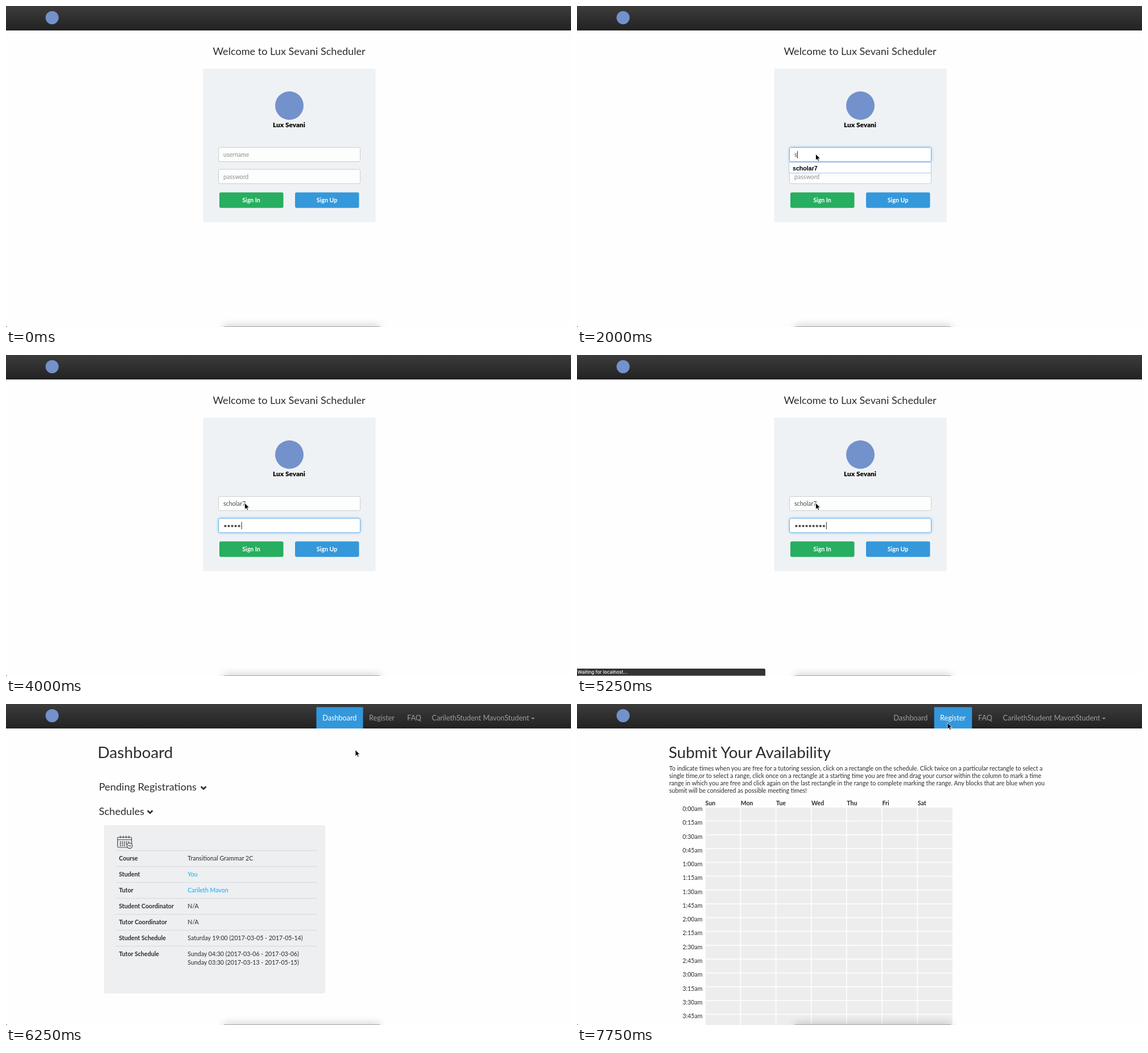
Recreate the animation shown at these times as an HTML page. Size 993x564 px, loop 8000 ms.

```html
<!DOCTYPE html>
<html lang="en">
<head>
<meta charset="utf-8">
<title>Scheduler sign-in</title>
<style>
  html, body { margin: 0; width: 100%; height: 100%; overflow: hidden; background: #fefefe; }
  svg { display: block; width: 993px; height: 564px; font: 10.6px Lato, sans-serif; fill: #2c2c2c; }
  text { white-space: pre; }
  .h1 { font-size: 27.8px; }
  .h3 { font-size: 18.1px; }
  .bold { font-weight: 700; }
  .mid { text-anchor: middle; }
  .end { text-anchor: end; }
  .link { fill: #0aaefb; }
  .button { fill: #fff; font-weight: 700; text-anchor: middle; }
  .mark { fill: #7391cb; }
  .wordmark { font-size: 11.8px; font-weight: 900; fill: #000; text-anchor: middle; }
  .nav text { font-size: 12.6px; fill: #9d9d9d; }
  .nav .on { fill: #fff; }
  .field { fill: #fcfdfd; stroke: #ccc; }
  .field.focus { fill: #fff; stroke: #66afe9; filter: drop-shadow(0 0 2.5px rgba(102,175,233,.6)); }
  .value { fill: #4a4a4a; }
  .hint { fill: #8f8f8f; }
  .option { font: 700 10.64px "Liberation Sans", Arial, sans-serif; fill: #000; }
  .status text { font: 500 8.2px Inter, sans-serif; fill: #fff; }
  .rule { stroke: #d6d9db; }
  .cell { fill: #ededed; }
  .chevron { fill: none; stroke: #2c2c2c; stroke-width: 2.7; }
  .icon { fill: none; stroke: #444; stroke-width: 1.2; }
</style>
</head>
<body>
<svg viewBox="0 0 993 564">
  <defs>
    <linearGradient id="bar" x2="0" y2="1">
      <stop stop-color="#3c3c3c"/><stop offset="1" stop-color="#222"/>
    </linearGradient>
    <filter id="soft" x="-20%" y="-200%" width="140%" height="500%"><feGaussianBlur stdDeviation="8"/></filter>
  </defs>
  <rect width="993" height="564" fill="#fefefe"/>

  <g id="login">
    <text class="h3 mid" x="497.5" y="86">Welcome to Lux Sevani Scheduler</text>
    <rect x="346.5" y="110" width="303" height="269.7" fill="#eff2f4"/>
    <circle class="mark" cx="498" cy="175" r="25"/>
    <text class="wordmark" x="497.5" y="213">Lux Sevani</text>
    <rect id="userBox" class="field" x="373.5" y="248.5" width="249" height="25" rx="2.8"/>
    <rect id="passBox" class="field" x="373.5" y="287" width="249" height="25" rx="2.8"/>
    <text id="user" x="382" y="265"></text>
    <text id="passHint" class="hint" x="382" y="303.7">password</text>
    <g id="dots" class="value"></g>
    <rect id="caret" width="1" height="12.5" fill="#222"/>
    <g id="list">
      <rect id="listBox" x="372.5" y="274.5" width="250" height="19" stroke="#a5c7ec"/>
      <text class="option" x="379" y="288.5">scholar7</text>
    </g>
    <rect x="375" y="327.5" width="112.5" height="27.3" rx="2.8" fill="#27ae60"/>
    <rect x="508" y="327.5" width="112.5" height="27.3" rx="2.8" fill="#3498db"/>
    <text class="button" x="431" y="345">Sign In</text>
    <text class="button" x="564" y="345">Sign Up</text>
  </g>

  <g id="dashboard">
    <text class="h1" x="161" y="94.5">Dashboard</text>
    <text class="h3" x="163.2" y="152">Pending Registrations</text>
    <text class="h3" x="163.2" y="194.5">Schedules</text>
    <path class="chevron" d="M342.8 145l4.4 4.4 4.4-4.4M248.8 187.3l4.4 4.4 4.4-4.4"/>
    <rect x="172" y="213" width="389" height="295.5" rx="3.5" fill="#edeff1"/>
    <g class="icon">
      <rect x="196.2" y="234" width="24.5" height="18" rx="1.5"/>
      <path d="M196 238.5h25M201 231.5v4.5M206 231.5v4.5M211 231.5v4.5M216 231.5v4.5"/>
      <path d="M200 242.5h18M200 245.7h14M200 248.9h11" stroke-width="1.9" stroke-dasharray="2 1.6"/>
      <circle cx="217.3" cy="249" r="4.7" fill="#edeff1"/>
      <path d="M214.8 248.6l2.5.7h2.6"/>
    </g>
    <g id="table"></g>
  </g>

  <g id="availability">
    <text class="h1" x="161" y="94.5">Submit Your Availability</text>
    <g id="intro"></g>
    <g id="grid"></g>
  </g>

  <rect width="993" height="43" fill="url(#bar)"/>
  <circle class="mark" cx="81" cy="20.5" r="11.5"/>
  <g id="nav" class="nav">
    <rect id="tab" y="5.5" height="37.5" fill="#3397dc"/>
    <text id="navDashboard" x="556.3" y="28.7">Dashboard</text>
    <text id="navRegister" x="638" y="28.7">Register</text>
    <text x="705" y="28.7">FAQ</text>
    <text class="end" x="919.5" y="28.7">CarilethStudent MavonStudent</text>
    <path d="M923 24h6l-3 3z" fill="#9d9d9d"/>
  </g>

  <rect x="383" y="563" width="274" height="14" filter="url(#soft)" opacity=".24" fill="#000"/>
  <rect x="383" y="563" width="274" height="1" fill="#aaa"/>
  <rect y="563" width="1.5" height="1" fill="#333"/>
  <g id="statusBar" class="status">
    <path d="M0 551h328.500q2.500 0 2.500 2.500V563.500H0z" fill="#333"/>
    <text id="status" x="1" y="560"></text>
  </g>
  <path id="pointer" d="M0 0V11.200L2.600 8.800 4.300 12.600 6.200 11.800 4.500 8.100H8z" fill="#000" stroke="#fff" stroke-width=".8"/>
</svg>
<script>
const $ = id => document.getElementById(id);
const show = (id, on) => $(id).style.display = on ? "" : "none";
const label = (x, y, words, kind = "") => `<text class="${kind}" x="${x}" y="${y}">${words}</text>`;

const rows = [
  ["Course", "Transitional Grammar 2C"],
  ["Student", "You", "link"],
  ["Tutor", "Carileth Mavon", "link"],
  ["Student Coordinator", "N/A"],
  ["Tutor Coordinator", "N/A"],
  ["Student Schedule", "Saturday 19:00 (2017-03-05 - 2017-05-14)"],
  ["Tutor Schedule", "Sunday 04:30 (2017-03-06 - 2017-03-06)"]
];
$("table").innerHTML = rows.map(([name, value, kind], i) => {
  const y = 257.5 + 28 * i;
  return `<path class="rule" d="M193 ${y}H547.500"/>` +
    label(198.5, y + 17.6, name, "bold") + label(319.3, y + 17.6, value, kind);
}).join("") + label(319.3, 458.3, "Sunday 03:30 (2017-03-13 - 2017-05-15)");

$("intro").innerHTML = [
  "To indicate times when you are free for a tutoring session, click on a rectangle on the schedule. Click twice on a particular rectangle to select a",
  "single time,or to select a range, click once on a rectangle at a starting time you are free and drag your cursor within the column to mark a time",
  "range in which you are free and click again on the last rectangle in the range to complete marking the range. Any blocks that are blue when you",
  "submit will be considered as possible meeting times!"
].map((line, i) => label(162, 117.3 + 13 * i, line)).join("");

const days = ["Sun", "Mon", "Tue", "Wed", "Thu", "Fri", "Sat"];
let grid = days.map((day, i) => label(225.5 + 62.2 * i, 178, day, "bold")).join("");
for (let r = 0; r < 16; r++) {
  const y = 182 + 24.27 * r;
  const minutes = String(r % 4 * 15).padStart(2, "0");
  grid += label(220.5, y + 6, `${r >> 2}:${minutes}am`, "end");
  days.forEach((_, c) => {
    grid += `<rect class="cell" x="${226 + 62.2 * c}" y="${y}" width="60.6" height="22.7"/>`;
  });
}
$("grid").innerHTML = grid;

// Each step changes only the named parts of the state.
const steps = [
  [0, { view: "login", at: null, focus: "", user: "", dots: 0, caret: false, list: 0, status: "", hover: false }],
  [250, { at: [560, 545] }],
  [500, { at: [480, 330] }],
  [750, { at: [380, 135] }],
  [1000, { at: [348, 215] }],
  [1250, { at: [419.5, 260], focus: "user" }],
  [1500, { caret: true }],
  [1750, { caret: false }],
  [2000, { user: "s", caret: true, list: 1 }],
  [2250, { user: "scholar7", list: 2 }],
  [2500, { list: 0 }],
  [2750, { focus: "pass" }],
  [3000, { caret: false }],
  [3250, { caret: true }],
  [3500, { dots: 1 }],
  [3750, { dots: 2 }],
  [4000, { dots: 5 }],
  [4250, { dots: 6 }],
  [4500, { dots: 8 }],
  [4750, { dots: 9 }],
  [5250, { status: "Waiting for localhost..." }],
  [5500, { view: "dashboard", caret: false, status: "" }],
  [5750, { at: [475, 212] }],
  [6000, { at: [566, 132] }],
  [6250, { at: [614, 80.5] }],
  [6500, { at: [639, 51] }],
  [6750, { at: [651, 33], hover: true, status: "localhost:3000/registrations" }],
  [7750, { view: "availability", status: "" }]
];
const states = [];
steps.forEach(([, change], i) => states.push({ ...states[i - 1], ...change }));

function draw(s) {
  ["login", "dashboard", "availability"].forEach(v => show(v, v === s.view));
  const home = s.view === "dashboard";
  show("nav", s.view !== "login");
  $("tab").setAttribute("x", home ? 545.5 : 627.7);
  $("tab").setAttribute("width", home ? 82 : 66.5);
  $("navDashboard").classList.toggle("on", home);
  $("navRegister").classList.toggle("on", s.hover);

  ["user", "pass"].forEach(f => $(f + "Box").classList.toggle("focus", s.focus === f));
  $("user").textContent = s.user || "username";
  $("user").setAttribute("class", s.user ? "value" : "hint");
  show("passHint", !s.dots);
  $("dots").innerHTML = Array.from({ length: s.dots }, (_, i) =>
    `<circle cx="${385.4 + 6.06 * i}" cy="300.5" r="2.1"/>`).join("");
  show("list", s.list);
  $("listBox").setAttribute("fill", s.list === 2 ? "#c5defb" : "#fff");

  const inPass = s.focus === "pass";
  const typed = s.user && s.view === "login" ? $("user").getComputedTextLength() : 0;
  show("caret", s.caret);
  $("caret").setAttribute("x", inPass ? 383.3 + 6.06 * s.dots : 382.3 + typed);
  $("caret").setAttribute("y", inPass ? 293.5 : 255);

  show("statusBar", s.status);
  $("status").textContent = s.status;
  show("pointer", s.at);
  if (s.at) $("pointer").setAttribute("transform", `translate(${s.at})`);
}

let current = -1;
function tick() {
  const t = performance.now() % 8000;
  const next = steps.findLastIndex(([start]) => start <= t);
  if (next !== current) draw(states[current = next]);
  requestAnimationFrame(tick);
}
tick();
</script>
</body>
</html>
```
